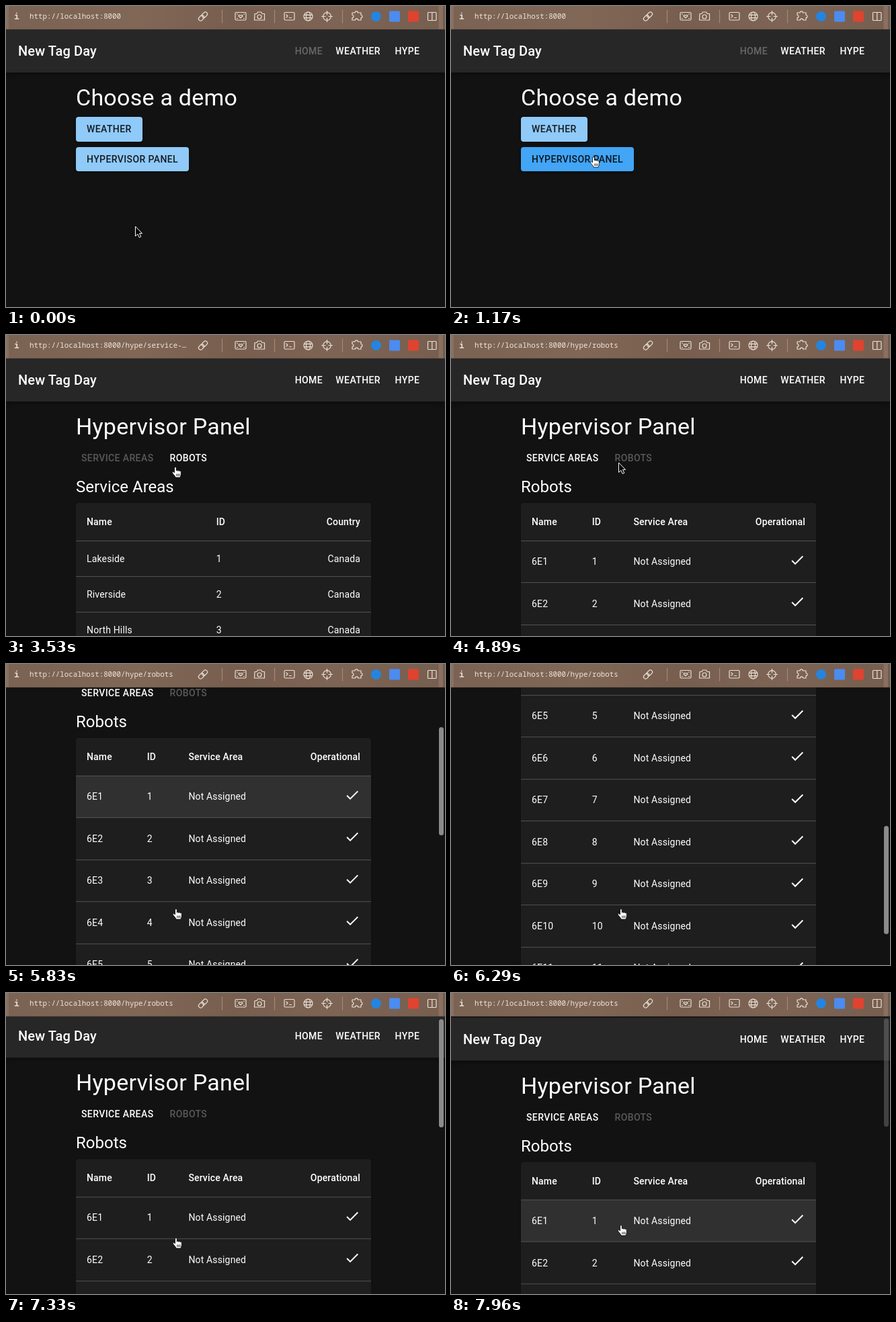
An HTML page that plays this animation: 653 by 448 pixels, repeating every 8000 ms.

```html
<!DOCTYPE html>
<html lang="en">
<head>
<meta charset="utf-8">
<title>Demo</title>
<style>
  html, body { margin: 0; width: 100%; height: 100%; overflow: hidden; background: #121212; }
  body { position: relative; color: #fff; font: 400 14px/20px Roboto, sans-serif; }
  svg { display: block; }

  #toolbar { position: absolute; left: 0; top: 0; width: 653px; height: 35px; overflow: hidden;
    background: linear-gradient(90deg, #8a7060 0 4px, #7b6353 4px, #806756 30%, #775e4e 52%, #7d6454 75%, #775f50 643px, #8a7060 644px 650px, #735b4c 650px); }
  #toolbar svg { position: absolute; inset: 0; }
  #url { position: absolute; left: 35px; top: 5px; white-space: pre; color: #f0e5dc;
    font: 500 10.8px/20px "Noto Sans Mono", "Liberation Mono", monospace; }

  #view { position: absolute; left: 0; top: 35px; width: 653px; height: 413px; overflow: hidden; }
  #page { position: absolute; left: 0; top: 0; width: 653px; }
  header { display: flex; align-items: center; height: 64px; box-sizing: border-box; padding: 0 24px 0 18px; background: #272727;
    box-shadow: 0 2px 4px -1px #0003, 0 4px 5px #00000024, 0 1px 10px #0000001f; }
  header b { flex: 1; font: 500 20px/32px Roboto, sans-serif; letter-spacing: .0075em; }
  main { position: absolute; left: 104px; top: 80px; width: 439px; }
  h1, h2 { margin: 0 0 8px; font-weight: 400; white-space: nowrap; }
  h1 { font-size: 34px; line-height: 42px; letter-spacing: .00735em; }
  h2 { font-size: 24px; line-height: 32px; }
  .btn { box-sizing: border-box; min-width: 64px; height: 36.5px; padding: 6px 8px; border-radius: 4px; text-align: center;
    font-weight: 500; line-height: 24.5px; letter-spacing: .02857em; white-space: nowrap; }
  .off { color: rgba(255, 255, 255, .3); }
  .fill { width: fit-content; margin-bottom: 8px; padding: 6px 16px; color: rgba(0, 0, 0, .87); background: #90caf9;
    box-shadow: 0 3px 1px -2px #0003, 0 2px 2px #00000024, 0 1px 5px #0000001f; }
  .tabs { display: flex; gap: 8px; margin-bottom: 8px; }
  .tabs .btn { min-width: 0; }

  .paper { border-radius: 4px; overflow: hidden; background: #1e1e1e; box-shadow: 0 1px 3px #0000001f; }
  table { width: 100%; border-collapse: collapse; }
  th, td { padding: 16px; border-bottom: 1px solid #515151; text-align: left; vertical-align: middle; letter-spacing: .01071em; }
  th { font-weight: 500; line-height: 24px; }
  tbody tr:last-child td { border-bottom: 0; }
  th:last-child, td:last-child { text-align: right; }
  td svg { margin: 0 0 5.5px auto; }
  tr.hover { background: rgba(255, 255, 255, .08); }
  .bone { height: 12px; margin: 4px 0; border-radius: 4px; background: #3b3b3b; }

  #thumb { position: absolute; left: 644px; width: 7px; height: 161px; border-radius: 4px; background: #8b8b8b; }
  #status { position: absolute; left: 4px; top: 416px; box-sizing: border-box; width: 155px; height: 24px;
    border: 1px solid #66503f; border-radius: 12px; background: #211a16; color: #cdc6c1;
    font: 400 12.3px/22px Inter, sans-serif; padding-left: 25px; white-space: nowrap; }
  #status svg { position: absolute; left: 7px; top: 4px; }
  #cursor { position: absolute; left: 0; top: 0; overflow: visible; }
</style>
</head>
<body>
<div id="view">
  <div id="page"></div>
</div>
<div id="thumb"></div>
<div id="toolbar">
  <svg width="653" height="35" fill="none" stroke="#eadfd6" stroke-width="1.2" stroke-linecap="round" stroke-linejoin="round">
    <path stroke="#5f4a3d" stroke-opacity=".6" d="M0 34.5H653"/>
    <path stroke="#a18a7b" d="M321.5 6V25M399.5 6V25M500.5 6V25"/>
    <path stroke-width="1.7" d="M14 13.5h2.2v5.500M13.500 19h5M15.900 10.400v.2"/>
    <g transform="rotate(-45 293 15.500)"><rect x="285" y="12.500" width="9" height="6" rx="3"/><rect x="292" y="12.500" width="9" height="6" rx="3"/></g>
    <rect x="341" y="9.500" width="16" height="11.500" rx="1.500"/>
    <path d="M343.500 12h1M353.500 12h1M343.500 18.500h1M353.500 18.500h1M349 17.800l-3-2.800q0-2.500 3-.8 3-1.700 3 .8z"/>
    <path d="M370 11.500h3l1.500-2.500h5l1.500 2.500h3.500v9.500h-15z"/><circle cx="377" cy="16" r="3"/>
    <rect x="414" y="9.500" width="15" height="11.500" rx="1.500"/><path d="M417 13l2 2-2 2M421.500 17.500h3"/>
    <circle cx="449.500" cy="15.500" r="6.500"/><ellipse cx="449.500" cy="15.500" rx="3" ry="6.500"/><path d="M443.500 13.300h12M443.500 17.700h12"/>
    <circle cx="477.500" cy="15.500" r="5.800"/><path d="M477.500 7.500v5.500M477.500 18v5.500M469.500 15.500h5.500M480 15.500h5.500"/>
    <path d="M515 10h4a2.200 2.200 0 0 1 4.400 0h4.600v3.500a2 2 0 0 1 0 4v3.500h-4.200a2.200 2.200 0 0 0-4.400 0h-4.400v-3.500a2 2 0 0 0 0-4z"/>
    <g stroke="none">
      <circle cx="550.500" cy="15.500" r="7.500" fill="#2484e0"/>
      <rect x="570" y="7.500" width="16" height="16" rx="1.500" fill="#4c8bf0"/>
      <rect x="598" y="7.500" width="16" height="16" rx="2" fill="#e0432f"/>
    </g>
    <rect x="627.500" y="9.500" width="12.500" height="12" rx="1"/><path d="M633.800 9.500v12"/>
  </svg>
  <div id="url"></div>
</div>
<div id="status">
  <svg width="14" height="14" fill="none" stroke="#a79d96" stroke-width="1.1"><rect x="5" y="1.500" width="4" height="7" rx="2"/><path d="M3 6.500q0 4 4 4t4-4M7 10.500V13M4.500 13h5M2 1.500l10 11"/></svg>
  localhost:8000/hype
</div>
<svg id="cursor" width="1" height="1">
  <g id="arrow"><path d="M.5 1V15.500L3.900 12.400 6.200 17.500 8.700 16.400 6.500 11.400H10.500Z" fill="#000" stroke="#fff"/></g>
  <g id="hand" transform="translate(-6 -1)">
    <path d="M4.500 9V2a1.400 1.400 0 0 1 2.800 0v4a1.300 1.300 0 0 1 2.500.5 1.200 1.200 0 0 1 2.400.6 1.100 1.100 0 0 1 2.100.7v3.200c0 2-1 2.700-1.200 5H6.200C5.700 13.600 2.600 11.600 1.300 9 .8 7.400 2.700 6.700 4.500 9Z" fill="#fff" stroke="#000" stroke-width=".8"/>
    <path d="M7.800 10.500v3.500M9.800 10.500v3.500M11.800 10.500v3.500" stroke="#000" stroke-width=".8"/>
  </g>
  <g id="beam" fill="none">
    <path id="stem" d="M-3.500 -8Q0 -8 0 -5.500V5.500Q0 8 -3.500 8M3.500 -8Q0 -8 0 -5.500M0 5.500Q0 8 3.500 8M-2 3H2" stroke="#fff" stroke-width="2.600"/>
    <use href="#stem" style="stroke:#000"/>
    <path d="M-3.500 -8Q0 -8 0 -5.500V5.500Q0 8 -3.500 8M3.500 -8Q0 -8 0 -5.500M0 5.500Q0 8 3.500 8M-2 3H2" stroke="#000"/>
  </g>
</svg>
<script>
const LOOP = 8000;
const OPEN_PANEL = 1820, AREAS_LOADED = 2560, OPEN_ROBOTS = 3990, ROBOTS_LOADED = 4890;
const MAX_SCROLL = 624.5;
const el = id => document.getElementById(id);
const clamp = v => Math.max(0, Math.min(1, v));
const ramp = (t, from, to) => clamp((t - from) / (to - from));

// Rows of [time, ...values]; ease shapes the progress between neighbours.
function sample(keys, t, ease = p => p) {
  const next = keys.findIndex(k => k[0] > t);
  if (next < 0) return keys[keys.length - 1].slice(1);
  if (next === 0) return keys[0].slice(1);
  const a = keys[next - 1], b = keys[next];
  const p = ease(ramp(t, a[0], b[0]));
  return a.slice(1).map((v, i) => v + (b[i + 1] - v) * p);
}

const pointerPath = [
  [740, 192, 327], [1170, 212, 225],
  [2880, 212, 225], [3300, 257, 212], [3710, 251, 193],
  [3880, 251, 193], [4150, 249, 189],
  [5020, 249, 189], [5410, 253, 365],
  [7650, 253, 365], [7960, 253, 346]
];
const scrollPath = [
  [5610, 0], [5650, 14], [5740, 65], [5830, 139], [6000, 290], [6200, 453],
  [6400, 578], [6500, 615], [6590, MAX_SCROLL], [6680, MAX_SCROLL],
  [6780, 570], [6950, 390], [7100, 210], [7210, 95], [7270, 42], [7330, 3],
  [7400, -16], [7480, -22], [7620, -13], [7800, -5], [7960, -1.5]
];

const check = '<svg width="24" height="24" fill="#fff"><path d="M9 16.170 4.830 12l-1.420 1.410L9 19 21 7l-1.410-1.410z"/></svg>';
const button = (label, off, kind = '') => `<div class="btn ${kind} ${off ? 'off' : ''}">${label}</div>`;
const row = (tag, cells) => `<tr>${cells.map(c => `<${tag}>${c}</${tag}>`).join('')}</tr>`;
const bones = heads => [heads.map(() => '<div class="bone"></div>')];
const tableOf = (heads, rows) => `<div class="paper"><table><thead>${row('th', heads)}</thead>
  <tbody>${rows.map(r => row('td', r)).join('')}</tbody></table></div>`;

const areaHeads = ['Name', 'ID', 'Country'];
const areas = [['Lakeside', 1, 'Canada'], ['Riverside', 2, 'Canada'], ['North Hills', 3, 'Canada']];
const robotHeads = ['Name', 'ID', 'Service Area', 'Operational'];
const robots = Array.from({ length: 12 }, (_, i) => [`6E${i + 1}`, i + 1, 'Not Assigned', check]);

const appBar = home => `<header><b>New Tag Day</b>${button('HOME', home)}${button('WEATHER')}${button('HYPE')}</header>`;
const panel = (title, onRobots, heads, rows) => `${appBar(false)}<main><h1>Hypervisor Panel</h1>
  <div class="tabs">${button('SERVICE AREAS', !onRobots)}${button('ROBOTS', onRobots)}</div>
  <h2>${title}</h2>${tableOf(heads, rows)}</main>`;

const scenes = [
  { at: 0, path: '', html: `${appBar(true)}<main><h1>Choose a demo</h1>
    ${button('WEATHER', false, 'fill')}${button('HYPERVISOR PANEL', false, 'fill')}</main>` },
  { at: OPEN_PANEL, path: '/hype/service-…', html: panel('Service Areas', false, areaHeads, bones(areaHeads)) },
  { at: AREAS_LOADED, path: '/hype/service-…', html: panel('Service Areas', false, areaHeads, areas) },
  { at: OPEN_ROBOTS, path: '/hype/robots', html: panel('Robots', true, robotHeads, bones(robotHeads)) },
  { at: ROBOTS_LOADED, path: '/hype/robots', html: panel('Robots', true, robotHeads, robots) }
];
let shown;

function pointerKind(t, x, y) {
  if (t < OPEN_PANEL) return y < 246 ? 'hand' : 'arrow';
  if (t < OPEN_ROBOTS) return y < 201.5 ? 'hand' : x < 250 && y > 211 ? 'beam' : 'arrow';
  return y > 306 ? 'hand' : 'arrow';
}

function hoveredRow(t, y) {
  if (t < ROBOTS_LOADED || y < 306) return -1;
  return t > 6480 && t < 7720 ? 10 : 0;
}

function render(t) {
  const scene = scenes.filter(s => s.at <= t).pop();
  if (scene !== shown) {
    shown = scene;
    el('page').innerHTML = scene.html;
    el('url').textContent = 'http://localhost:8000' + scene.path;
  }

  const [x, y] = sample(pointerPath, t, p => 1 - (1 - p) ** 2);
  const kind = pointerKind(t, x, y);
  for (const id of ['arrow', 'hand', 'beam']) el(id).style.display = id === kind ? '' : 'none';
  el('cursor').style.transform = `translate(${Math.round(x)}px, ${Math.round(y)}px)`;

  if (scene === scenes[0]) {
    const k = ramp(t, 960, 1170);
    const mix = (a, b) => Math.round(a + (b - a) * k);
    document.querySelectorAll('.fill')[1].style.background = `rgb(${mix(144, 66)}, ${mix(202, 165)}, ${mix(249, 245)})`;
  }
  const hovered = hoveredRow(t, y);
  document.querySelectorAll('tbody tr').forEach((tr, i) => tr.classList.toggle('hover', i === hovered));

  const [scroll] = sample(scrollPath, t);
  el('page').style.transform = `translateY(${-scroll}px)`;
  el('thumb').style.top = 38 + 249 * clamp(scroll / MAX_SCROLL) + 'px';
  el('thumb').style.opacity = t < 5640 ? 0 : 1 - .6 * ramp(t, 7860, 7960);
  el('status').style.opacity = ramp(t, 1560, 1700) * (1 - ramp(t, 2220, 2340));
}

function tick() {
  render(performance.now() % LOOP);
  requestAnimationFrame(tick);
}
tick();
</script>
</body>
</html>
```
